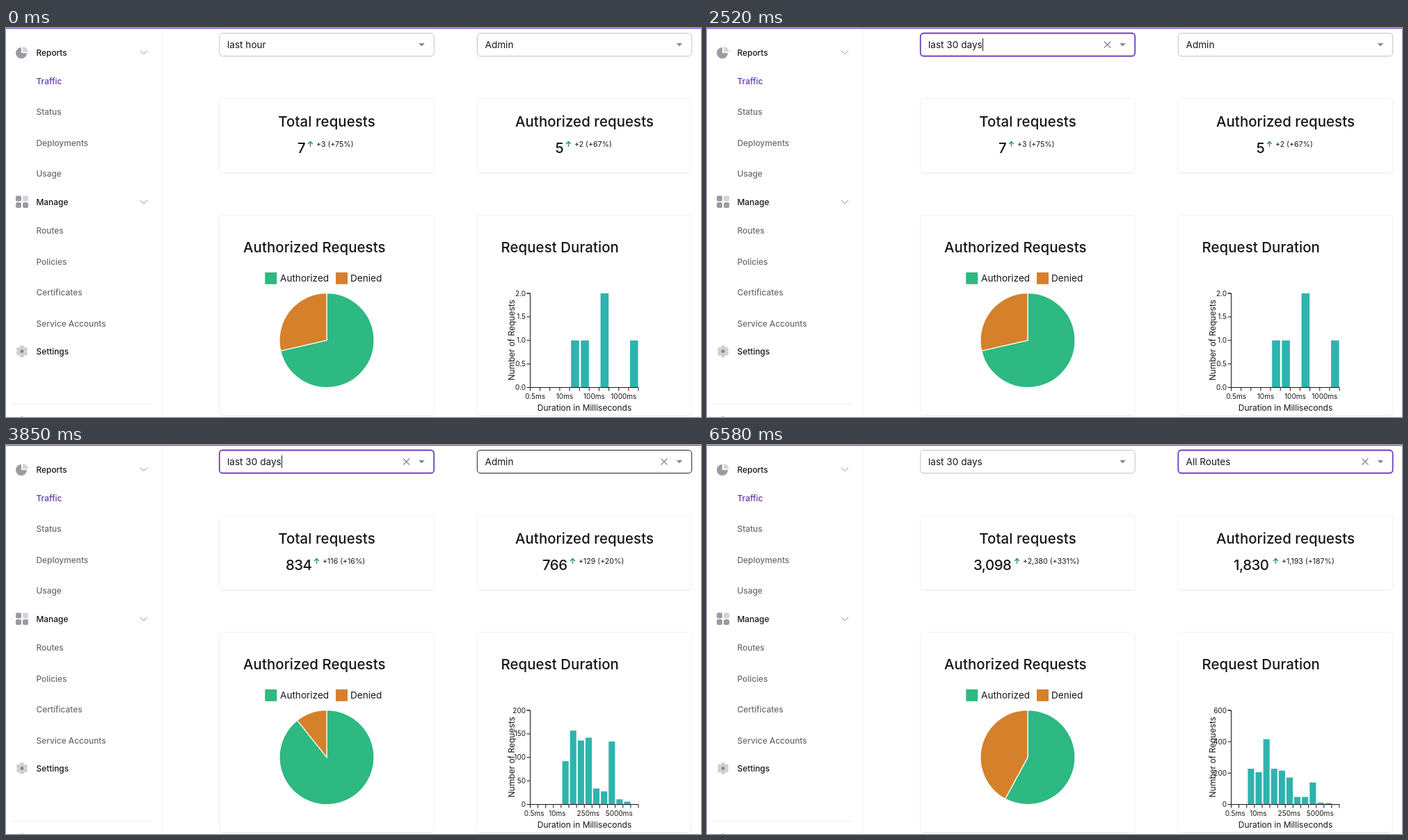
These frames come from a looping animation (999x560 px, 6.93 s). An HTML page:

```html
<!DOCTYPE html>
<html lang="en">
<head>
<meta charset="utf-8">
<title>Traffic report</title>
<style>
  html, body { margin: 0; width: 100%; height: 100%; overflow: hidden; background: #fff; }
  svg { display: block; width: 999px; height: 560px; font-family: Inter, sans-serif; fill: #161616; }
  .nav { font-size: 11.9px; font-weight: 500; }
  .head { font-size: 20.4px; font-weight: 500; letter-spacing: .08px; }
  .count { font-size: 20.4px; font-weight: 500; letter-spacing: -.5px; }
  .trend { font-size: 10.6px; }
  .field { font-size: 13.6px; }
  .option { font-size: 11.9px; letter-spacing: .1px; }
  .tick { font-size: 10px; }
  .axis { font-size: 12px; }
  .mid { text-anchor: middle; }
  .end { text-anchor: end; }
  .line { fill: none; stroke: #161616; }
  .card { fill: #fff; stroke: #f1f1f1; }
  .paper { fill: #fff; filter: drop-shadow(0 1px 1px rgba(0, 0, 0, .16)); }
</style>
</head>
<body>
<svg viewBox="0 0 999 560"><g id="base"></g><g id="live"></g></svg>
<script>
const LOOP = 6930, STEP = 70, EASE_MS = 576;
const PURPLE = '#6e3fbf', GREEN = '#2eb882', ORANGE = '#d5802b', TEAL = '#2fb3ae';

const text = (x, y, cls, str, fill = '#161616') =>
  `<text x="${x}" y="${y}" class="${cls}" fill="${fill}">${str}</text>`;
const rect = (x, y, w, h, fill, extra = '') =>
  `<rect x="${x}" y="${y}" width="${w}" height="${h}" fill="${fill}" ${extra}/>`;
const path = (d, stroke, width = 1) =>
  `<path d="${d}" fill="none" stroke="${stroke}" stroke-width="${width}"/>`;
const lerp = (a, b, p) => a + (b - a) * p;
const within = (t, a, b) => t >= a && t < b;
const cubicOut = (t, start, ms) => 1 - (1 - Math.min(1, Math.max(0, (t - start) / ms))) ** 3;

const views = [
  { total: ['7', 419, '+3 (+75%)', 446], allowed: ['5', 789.5, '+2 (+67%)', 817],
    share: 5 / 7, bins: 11, max: 2, first: 4, values: [1, 1, 0, 2, 0, 0, 1],
    yLabels: ['0.0', '0.5', '1.0', '1.5', '2.0'],
    xLabels: { 0: '0.5ms', 3: '10ms', 6: '100ms', 9: '1000ms' } },
  { total: ['834', 402, '+116 (+16%)', 455], allowed: ['766', 771, '+129 (+20%)', 823],
    share: .893, bins: 14, max: 200, first: 3, values: [1, 92, 157, 136, 142, 34, 28, 134, 11, 6],
    yLabels: ['0', '50', '100', '150', '200'],
    xLabels: { 0: '0.5ms', 3: '10ms', 7: '250ms', 11: '5000ms' } },
  { total: ['3,098', 383, '+2,380 (+331%)', 454], allowed: ['1,830', 757, '+1,193 (+187%)', 826],
    share: .579, bins: 14, max: 600, first: 2, values: [228, 206, 416, 228, 216, 172, 48, 48, 140, 12, 9],
    yLabels: ['0', '200', '400', '600'],
    xLabels: { 0: '0.5ms', 3: '10ms', 7: '250ms', 11: '5000ms' } },
];

function sidebar() {
  const chevron = y => path(`M193 ${y - 2.5}l5 5l5-5`, '#8c8c8c');
  const section = (y, name) => text(43.5, y + 4.3, 'nav', name);
  const links = (top, names) => names.map((name, i) =>
    text(43.5, top + 44.4 * i + 4.3, 'nav', name, name === 'Traffic' ? '#5e34b1' : '#6b6b6b')).join('');
  const teeth = [0, 60, 120].map(a =>
    rect(20.2, 457, 5.6, 17, '#d0d0d4', `rx="1.5" transform="rotate(${a} 23 465.5)"`)).join('');
  return section(35.5, 'Reports') + section(251, 'Manage') + section(466, 'Settings') +
    links(76.7, ['Traffic', 'Status', 'Deployments', 'Usage']) +
    links(292, ['Routes', 'Policies', 'Certificates', 'Service Accounts']) +
    chevron(35) + chevron(250.5) +
    '<path d="M22 28a8 8 0 1 0 8 8h-8z" fill="#9b9ba2"/><path d="M24 27a7.5 7.5 0 0 1 7.5 7.5H24z" fill="#d4d4d8"/>' +
    rect(14, 241.5, 8, 8, '#9b9ba2', 'rx="2"') + rect(24, 241.5, 8, 8, '#d4d4d8', 'rx="2"') +
    rect(14, 251, 8, 8, '#9b9ba2', 'rx="2"') + rect(24, 251, 8, 8, '#9b9ba2', 'rx="2"') +
    teeth + '<circle cx="23" cy="465.5" r="6.3" fill="#d0d0d4"/><circle cx="23" cy="465.5" r="2.4" fill="#85858c"/>' +
    rect(224, 1, 1, 559, '#f3f3f3') + rect(8, 541, 201, 1, '#eeeeee') + rect(21, 559, 4, 1, '#c4c4c8');
}

function staticParts() {
  const card = (x, y, h) => `<rect x="${x}.5" y="${y}.5" width="309" height="${h}" rx="4" class="card"/>` +
    rect(x + 3, y + h + 1, 304, 1, '#f4f4f4');
  return rect(0, 0, 999, 560, '#fff') + sidebar() +
    card(306, 101, 107) + card(676, 101, 107) + card(306, 269, 288) + card(676, 269, 288) +
    text(461, 142, 'head mid', 'Total requests') + text(831.5, 142, 'head mid', 'Authorized requests') +
    text(341, 323, 'head', 'Authorized Requests') + text(711.5, 323, 'head', 'Request Duration') +
    rect(372.3, 351.8, 17, 17, GREEN) + text(394, 365, 'field', 'Authorized') +
    rect(474, 351.8, 17, 17, ORANGE) + text(495, 365, 'field', 'Denied') +
    text(831.5, 550.8, 'axis mid', 'Duration in Milliseconds') +
    rect(0, 0, 999, 1, '#7440d8');
}

function stat([count, x, trend, trendX]) {
  return text(x, 179.5, 'count', count) + text(trendX, 171, 'trend', trend) +
    path(`M${trendX - 8.5} 171v-7.5m-3.3 3.5l3.3-3.5l3.3 3.5`, '#23906a', 1.3);
}

function pie(share) {
  const cx = 461, cy = 449.6, r = 68, a = share * 2 * Math.PI;
  const x = cx + r * Math.sin(a), y = cy - r * Math.cos(a);
  const slice = (x1, y1, x2, y2, large, fill) =>
    `<path d="M${cx} ${cy}L${x1} ${y1}A${r} ${r} 0 ${+large} 1 ${x2} ${y2}z" fill="${fill}" stroke="#fff" stroke-width="1.2"/>`;
  return slice(cx, cy - r, x, y, share > .5, GREEN) + slice(x, y, cx, cy - r, share < .5, ORANGE);
}

function histogram(from, to, p) {
  const left = 753.5, bottom = 517.5, width = 155.5, height = 135.5;
  const level = (view, i) => (view.values[i - view.first] || 0) / view.max * height;
  const barBin = width / lerp(from.bins, to.bins, p), bin = width / to.bins;
  let out = '', axes = `M${left - 5} ${bottom - height}H${left}V${bottom}H${left + width}`;
  for (let i = 0; i < to.bins; i++) {
    const entering = i >= from.bins;
    if (entering && p < .7) continue;
    const h = entering ? level(to, i) : lerp(level(from, i), level(to, i), p);
    const w = entering ? bin : barBin;
    if (h > .2) out += rect(left + i * w + w * .15, bottom - h, w * .82, h, TEAL);
  }
  for (let i = 0; i <= to.bins; i++) axes += `M${left + i * bin} ${bottom}v5`;
  to.yLabels.forEach((label, i, all) => {
    const y = bottom - height * i / (all.length - 1);
    axes += `M${left - 5} ${y}h5`;
    out += text(747, y + 3.6, 'tick end', label);
  });
  for (const [i, label] of Object.entries(to.xLabels))
    out += text(left + (+i + .5) * bin, 533.6, 'tick mid', label);
  return out + `<path d="${axes}" class="line"/>` +
    '<text class="axis mid" transform="translate(730.5 449.3) rotate(-90)">Number of Requests</text>';
}

function select(x, value, valueWidth, s) {
  const color = s.focus ? PURPLE : s.hover ? '#212121' : '#c4c4c4';
  let out = `<rect x="${x + .8}" y="7.5" width="308.4" height="33" rx="4.5" fill="#fff" stroke="${color}" stroke-width="${s.focus ? 1.8 : 1}"/>`;
  if (s.open) out += rect(x + 12, 14, valueWidth + 1, 20, '#abcff8');
  out += text(x + 12, 28.9, 'field', value);
  if (s.caret) out += rect(x + 12 + valueWidth, 15, 1, 18, '#161616');
  if (s.focus || s.hover) out += path(`M${x + 265} 19.5l9 9m0-9l-9 9`, '#858585', 1.2);
  return out + `<path d="M${x + 287.2} ${s.open ? 26 : 22}h8.6l-4.3 ${s.open ? -4.3 : 4.3}z" fill="#858585"/>`;
}

function menu(x, options, chosen, hovered) {
  const row = 29.35, top = 48.3;
  return `<rect x="${x + 1}" y="41.7" width="308" height="${options.length * row + 13.6}" rx="3.5" class="paper"/>` +
    options.map((name, i) => {
      const fill = i === chosen ? (hovered < 0 ? '#efe7fc' : '#f5f1fb') : i === hovered ? '#f3f3f3' : '#fff';
      return rect(x + 1, top + i * row, 308, row, fill) + text(x + 15, top + i * row + 19, 'option', name);
    }).join('');
}

function pieShare(t) {
  if (t >= 5040) return lerp(views[1].share, views[2].share, cubicOut(t, 5062, EASE_MS));
  if (t > 3440) return lerp(.995, views[1].share, cubicOut(t, 3440, 270));
  return lerp(views[0].share, .998, cubicOut(t, 3138, 400));
}

function frame(t) {
  const now = t >= 5040 ? 2 : t >= 3080 ? 1 : 0;
  const start = [0, 3102, 5062][now];
  const view = views[now], before = views[Math.max(0, now - 1)];
  const period = {
    focus: within(t, 700, 3990), open: within(t, 1540, 2520),
    caret: within(t, 700, 1260) || within(t, 2520, 3080) || within(t, 3570, 3990),
  };
  const route = {
    focus: t >= 3990, hover: t >= 3290, open: within(t, 4060, 5040),
    caret: within(t, 5040, 5600) || within(t, 6090, 6580),
  };
  let out = stat(view.total) + stat(view.allowed) + pie(pieShare(t)) +
    histogram(before, view, now ? cubicOut(t, start, EASE_MS) : 1) +
    (t < 2520 ? select(306, 'last hour', 56, period) : select(306, 'last 30 days', 78, period)) +
    (t < 5040 ? select(676.5, 'Admin', 41, route) : select(676.5, 'All Routes', 64.5, route));
  if (period.open) out += menu(306, ['last 30 days', 'last 2 weeks', 'last 7 days', 'last 24 hrs',
    'last 12 hrs', 'last 3 hrs', 'last hour'], 6, t < 1680 ? -1 : 0);
  if (route.open) out += menu(676.5, ['All Routes', 'Admin', 'argocd'], 1, t < 4200 ? -1 : 0);
  return out;
}

const live = document.getElementById('live');
document.getElementById('base').innerHTML = staticParts();
const origin = performance.now();
let shown = -1;
function tick() {
  const t = Math.floor((performance.now() - origin) % LOOP / STEP) * STEP;
  if (t !== shown) live.innerHTML = frame(shown = t);
  requestAnimationFrame(tick);
}
tick();
</script>
</body>
</html>
```
